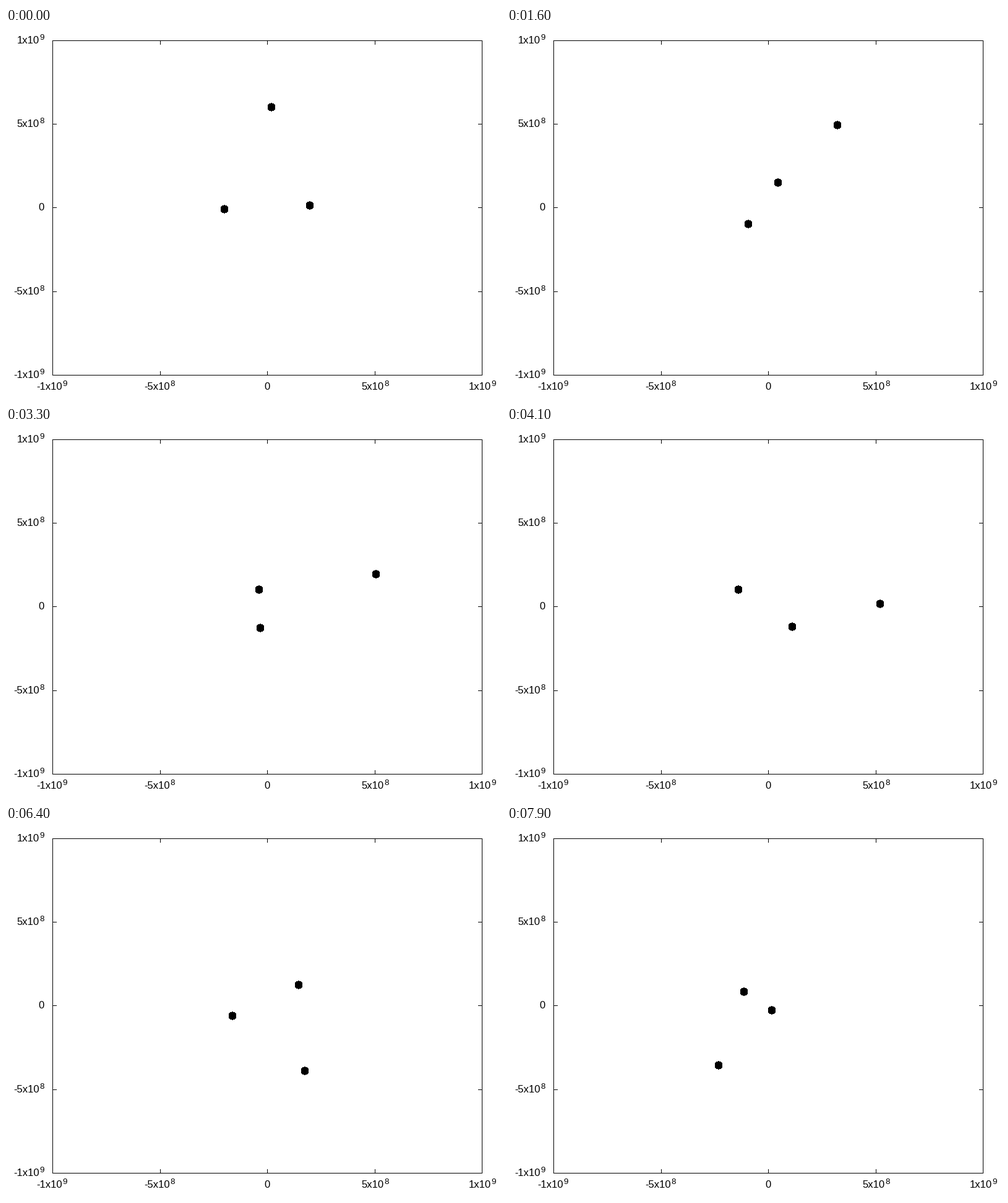
Animation of 800x600 px, one loop 8 s. Source, as a matplotlib script:

```python
import matplotlib.pyplot as plt
from matplotlib.animation import FuncAnimation
from matplotlib.patches import Ellipse

W, H, DPI = 800, 600, 100
FRAMES, INTERVAL, SUBSTEPS = 80, 100, 60
LEFT, RIGHT, TOP, BOTTOM = 75, 769, 20, 561
PX = 72 / DPI
FONT = "Liberation Sans"

# Lengths in 1e6, time in frames; the third body is a massless satellite.
GM_TOTAL = 283600
GM = (GM_TOTAL * 10 / 17, GM_TOTAL * 7 / 17)
START = (-200 + 0j, 200 + 0j, 600j)
SPEED = (-8j, 12j, 20 + 0j)


def pull(pos):
    acc = []
    for p in pos:
        total = 0j
        for gm, q in zip(GM, pos):
            if q != p:
                total += gm * (q - p) / abs(q - p) ** 3
        acc.append(total)
    return acc


def simulate():
    """Leapfrog integration, one snapshot per frame."""
    pos, vel = list(START), list(SPEED)
    dt = 1 / SUBSTEPS
    acc = pull(pos)
    shots = []
    for _ in range(FRAMES):
        for _ in range(SUBSTEPS):
            vel = [v + a * dt / 2 for v, a in zip(vel, acc)]
            pos = [p + v * dt for p, v in zip(pos, vel)]
            acc = pull(pos)
            vel = [v + a * dt / 2 for v, a in zip(vel, acc)]
        shots.append(pos)
    return shots


def to_pixel(p):
    x = (LEFT + RIGHT) / 2 + p.real * (RIGHT - LEFT) / 2000
    y = (TOP + BOTTOM) / 2 - p.imag * (BOTTOM - TOP) / 2000
    return round(x), round(y)


fig = plt.figure(figsize=(W / DPI, H / DPI), dpi=DPI, facecolor="white")
ax = fig.add_axes([0, 0, 1, 1])
ax.set_xlim(0, W)
ax.set_ylim(H, 0)
ax.axis("off")


def line(x0, y0, x1, y1):
    """One pixel wide, through pixel centres."""
    ax.plot([x0 + 0.5, x1 + 0.5], [y0 + 0.5, y1 + 0.5], color="black",
            lw=PX, snap=False, solid_capstyle="projecting")


def text(x, y, s, size=12, ha="left"):
    ax.text(x, y, s, family=FONT, size=size, ha=ha, va="baseline",
            color="black")


def power(x, y, base, exponent):
    """Base ends and raised exponent starts at x."""
    text(x, y, base, ha="right")
    text(x + 0.5, y - 6, exponent, 9.6)


for y in (TOP, BOTTOM):
    line(LEFT, y, RIGHT, y)
for x in (LEFT, RIGHT):
    line(x, TOP, x, BOTTOM)

LABELS = (("-1x10", "9"), ("-5x10", "8"), ("0", ""), ("5x10", "8"), ("1x10", "9"))
for i, (base, exponent) in enumerate(LABELS):
    x = int(LEFT + (RIGHT - LEFT) * i / 4 + 0.5)
    y = round(BOTTOM - (BOTTOM - TOP) * i / 4)
    line(x, TOP, x, TOP + 6)
    line(x, BOTTOM, x, BOTTOM - 6)
    line(LEFT, y, LEFT + 6, y)
    line(RIGHT, y, RIGHT - 6, y)
    if exponent:
        power(54, y + 5, base, exponent)
        power(x + (16 if i < 2 else 15), 585, base, exponent)
    else:
        text(62, y + 5, base, ha="right")
        text(x, 585, base, ha="center")

PATH = simulate()
dots = [ax.add_patch(Ellipse((0, 0), 11.9, 12.1, color="black", lw=0,
                             antialiased=False, zorder=3)) for _ in START]


def update(frame):
    for dot, p in zip(dots, PATH[frame]):
        dot.center = to_pixel(p)
    return dots


anim = FuncAnimation(fig, update, frames=FRAMES, interval=INTERVAL,
                     repeat=True, repeat_delay=0, blit=False)
plt.show()
```
